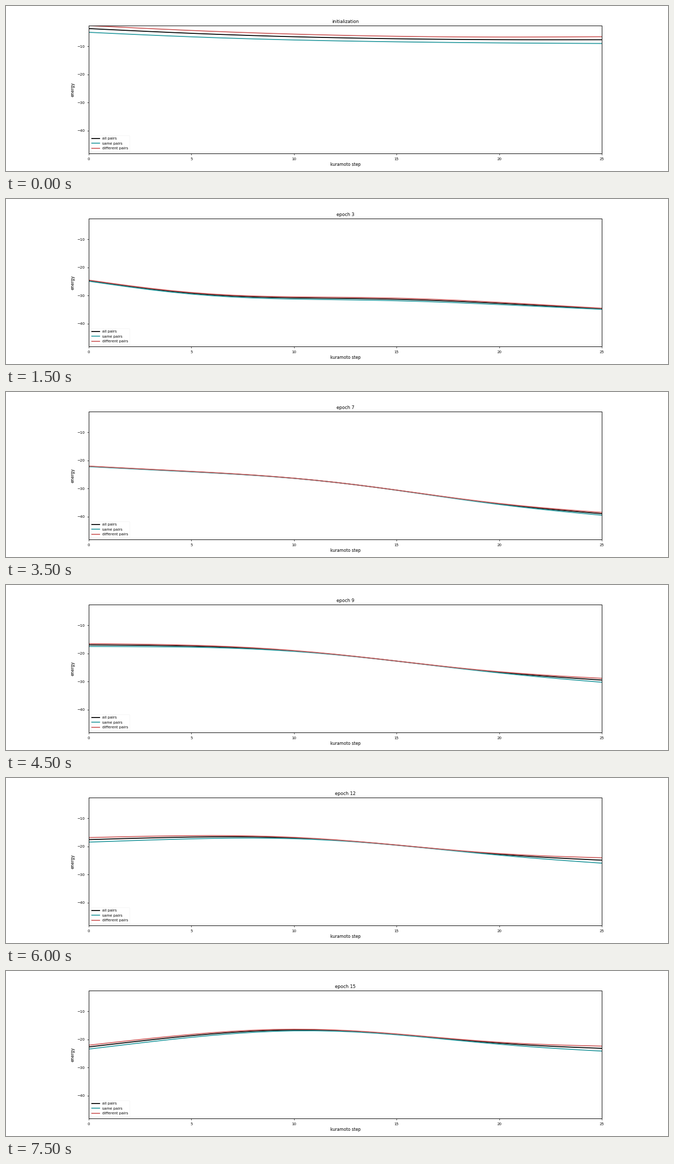
A matplotlib script that plays this animation: 1280x320 px, repeating every 8000 ms.

```python
import numpy as np
import matplotlib.pyplot as plt
from matplotlib.animation import FuncAnimation

EPOCHS = 16
STEPS = np.arange(26)
T = STEPS / 25
RED_SHARE = 0.81  # distance of the upper line relative to the lower one

# mean energy: start, end, three sine waves; gap: start, end, bulge
SHAPES = np.array([
    [-3.68, -7.64, -1.36, -0.06, -0.03, 1.32, 1.33, -0.22],
    [-16.6, -20.2, -1.50, -0.60, -0.20, 0.45, 0.45, 0.10],
    [-24.66, -34.65, -1.66, -1.26, -0.32, 0.22, 0.22, 0.26],
    [-22.60, -43.42, -3.37, 0.77, 0.16, -0.20, 2.14, 0.20],
    [-22.08, -38.90, 1.95, 0.73, -0.36, 0.10, 0.55, -0.31],
    [-14.31, -24.57, 2.50, 1.06, -0.10, 0.78, 0.88, -0.74],
    [-17.55, -24.86, 2.97, 0.91, -0.26, 0.89, 1.06, -0.86],
    [-22.64, -23.14, 5.57, 1.23, -0.37, 0.76, 0.98, -0.66],
])
# where each epoch lies along the list of shapes
PACE = [0, 0.95, 1, 2, 2.67, 3, 3.95, 4, 4.5, 4.66, 5, 5.4, 6, 6.65, 6.92, 7]


def wave(start, end, *amps):
    """Straight line from start to end plus sine harmonics."""
    bends = (a * np.sin(k * np.pi * T) for k, a in enumerate(amps, 1))
    return start + (end - start) * T + sum(bends)


def curves(epoch):
    pos = PACE[epoch]
    i = min(int(pos), len(SHAPES) - 2)
    shape = SHAPES[i] + (pos - i) * (SHAPES[i + 1] - SHAPES[i])
    start, end, bulge = shape[5:]
    mean = wave(*shape[:5])
    gap = wave(start, end, bulge, -bulge / 4)
    return mean, mean - gap, mean + RED_SHARE * gap


plt.rcParams["font.family"] = "DejaVu Sans"
plt.rcParams["axes.linewidth"] = 1.1
fig, ax = plt.subplots(figsize=(20, 5), dpi=64)
fig.subplots_adjust(left=0.125, right=0.9, bottom=0.1075, top=0.88)

styles = [("all pairs", "black"), ("same pairs", "#2a9ba0"),
          ("different pairs", "#cd5c5c")]
lines = [ax.plot(STEPS, 0 * T, color=color, lw=2, label=label)[0]
         for label, color in styles]

ax.set_xlim(0, 25)
ax.set_ylim(-47.99, -2.69)
ax.set_xticks(range(0, 26, 5))
ax.set_yticks(range(-40, 0, 10))
ax.tick_params(labelsize=8, length=3.5, pad=5.5)
ax.set_xlabel("kuramoto step", fontsize=9)
ax.set_ylabel("energy", fontsize=9)
title = ax.set_title("", fontsize=9.7)
ax.legend(loc="lower left", fontsize=8, edgecolor="0.95")


def update(epoch):
    for line, y in zip(lines, curves(epoch)):
        line.set_ydata(y)
    title.set_text(f"epoch {epoch}" if epoch else "initialization")
    return [*lines, title]


anim = FuncAnimation(fig, update, frames=EPOCHS, interval=500,
                     repeat=True, repeat_delay=0, blit=False)
plt.show()
```
